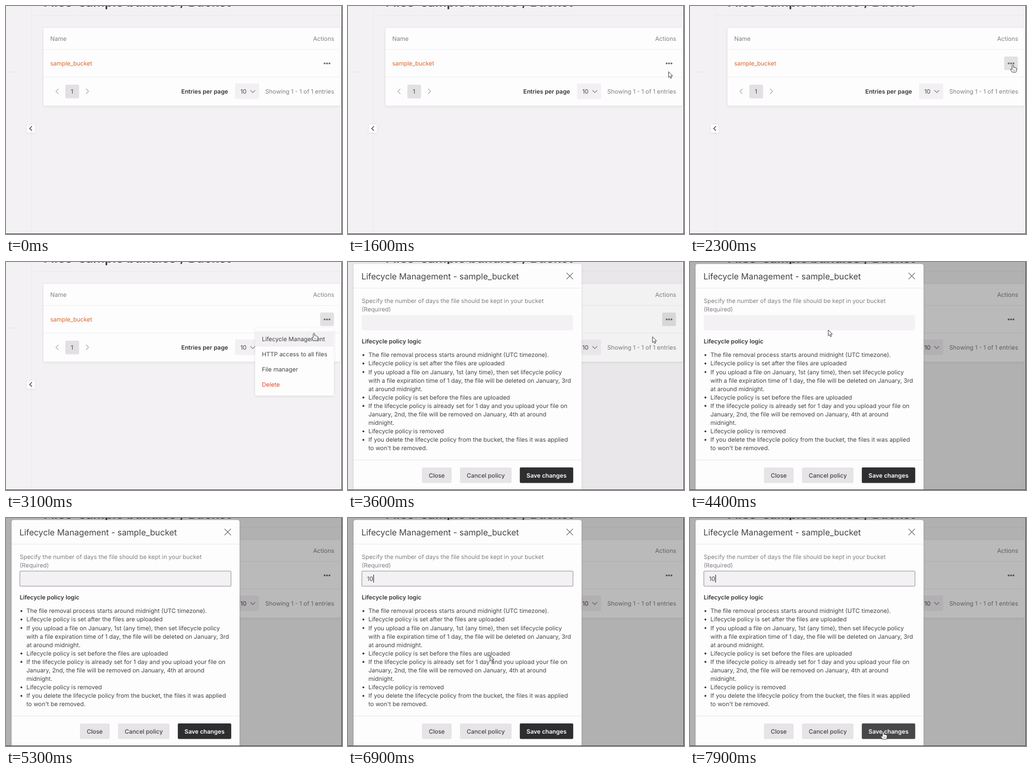
Animation of 600 by 406 pixels, one loop 8 s. Source, as an HTML page:

```html
<!DOCTYPE html>
<html lang="en">
<head>
<meta charset="utf-8">
<title>Lifecycle management</title>
<style>
  html, body { margin: 0; width: 100%; height: 100%; overflow: hidden; background: #f3f1f3; }
  svg { display: block; width: 600px; height: 406px; }
  text { font: 400 10.55px Inter, "Open Sans", sans-serif; fill: #807e80; text-rendering: geometricPrecision; white-space: pre; }
  .dark { fill: #444345; }
  .medium { font-weight: 500; }
  .bold { font-weight: 600; fill: #353436; }
  .title { font-size: 14.95px; fill: #444345; }
  .heading { font-size: 22.8px; font-weight: 600; fill: #353436; }
  .mid { text-anchor: middle; }
  .end { text-anchor: end; }
  .rule { stroke: #ebe9eb; }
  .faint { stroke: #f1eff1; }
  .icon { fill: none; stroke: #666567; stroke-width: 1.1; }
  .box { fill: #e6e4e6; }
  .paper { fill: #fefdfe; }
  .pointer { fill: #fff; stroke: #353436; stroke-width: .9; stroke-linejoin: round; }
</style>
</head>
<body>
<svg viewBox="0 0 600 406">
  <defs>
    <filter id="shadow" x="-10%" y="-10%" width="120%" height="125%">
      <feDropShadow dx="0" dy="1" stdDeviation="2" flood-opacity=".1"/>
    </filter>
  </defs>
  <rect width="600" height="406" fill="#f3f1f3"/>
  <path class="rule" d="M45.5 0V406M45 16.5H600M0 117.5H28"/>
  <text class="heading" x="67" y=".6">Files</text>
  <text class="heading" x="130" y=".6">sample bundles</text>
  <text class="heading" x="311" y=".6">/</text>
  <text class="heading" x="325" y=".6">Bucket</text>

  <rect class="paper" x="67" y="39" width="531" height="138.5" rx="3" filter="url(#shadow)"/>
  <path class="faint" d="M67 77.5H598M67 126.5H598"/>
  <text x="79" y="62">Name</text>
  <text class="end" x="586" y="62">Actions</text>
  <text x="79" y="106" style="fill:#dd6427">sample_bucket</text>
  <rect id="actionBg" x="561" y="90" width="24.5" height="24" rx="2" fill="#e2e0e2"/>
  <g fill="#6b6a6c">
    <circle cx="569" cy="102.2" r="1.6"/><circle cx="573.3" cy="102.2" r="1.6"/><circle cx="577.6" cy="102.2" r="1.6"/>
  </g>
  <rect x="106" y="140" width="24.5" height="24.5" rx="2" fill="#e2e0e2"/>
  <text class="mid dark" x="118" y="156">1</text>
  <path class="icon" d="M93.5 147.5L89 152L93.5 156.5M143 147.5L147.5 152L143 156.5" style="stroke:#b0aeb0"/>
  <text class="bold" x="313" y="156">Entries per page</text>
  <rect x="409" y="138" width="43" height="27.5" rx="2" fill="#f2f0f2"/>
  <text class="dark" x="418.5" y="156">10</text>
  <path class="icon" d="M436.5 150L440.7 154.2L445 150" style="stroke:#8a888a"/>
  <text class="end" x="586" y="156">Showing 1 - 1 of 1 entries</text>

  <rect x="37" y="211" width="14.5" height="14.5" rx="2" class="paper" filter="url(#shadow)"/>
  <path class="icon" d="M46.3 214.2L42.3 218.2L46.3 222.2" style="stroke:#222"/>

  <g id="menu">
    <rect class="paper" x="445" y="117" width="140.5" height="121" rx="2" filter="url(#shadow)"/>
    <rect x="445" y="123.5" width="140.5" height="27" fill="#f2f0f2"/>
    <text class="dark" x="457" y="141">Lifecycle Management</text>
    <text class="dark" x="457" y="168">HTTP access to all files</text>
    <text class="dark" x="457" y="195">File manager</text>
    <text x="457" y="222" style="fill:#e14a2b">Delete</text>
  </g>

  <rect id="shade" width="600" height="406"/>

  <g id="modal">
    <rect class="paper" x="10" y="3.5" width="407" height="412" rx="4" filter="url(#shadow)"/>
    <path class="rule" d="M10 46.5H417M10 352.5H417"/>
    <text class="title" x="24" y="30.5">Lifecycle Management - sample_bucket</text>
    <path class="icon" d="M390.3 19.3L401.7 30.7M401.7 19.3L390.3 30.7"/>
    <text x="24.5" y="72.5">Specify the number of days the file should be kept in your bucket</text>
    <text x="24.5" y="87.7">(Required)</text>
    <rect id="field" x="24.7" y="94.5" width="377" height="27" rx="2" fill="#f3f1f3" stroke-width="1.5"/>
    <text id="value" class="dark" x="34" y="112"></text>
    <rect id="caret" x="45" y="101" width="1" height="14" fill="#222"/>
    <text class="bold" x="24.5" y="145">Lifecycle policy logic</text>
    <g id="list"></g>
    <rect class="box" x="132" y="366" width="53" height="27.5" rx="2"/>
    <rect class="box" x="200" y="366" width="92" height="27.5" rx="2"/>
    <rect id="save" x="306.8" y="365.7" width="95.4" height="27.8" rx="2"/>
    <text class="mid dark medium" x="158.5" y="383.7">Close</text>
    <text class="mid dark medium" x="246" y="383.7">Cancel policy</text>
    <text class="mid bold" x="354.5" y="383.7" style="fill:#fff">Save changes</text>
  </g>

  <g id="cursor">
    <path id="arrow" class="pointer" d="M0 0V10.4L2.3 8.3L3.9 12L5.6 11.2L4.1 7.7H7.3Z"/>
    <g id="hand">
      <path class="pointer" d="M-1.3 1.2Q0-.9 1.3 1.2V5Q2.6 4.2 3.4 5.4Q4.6 4.7 5.4 5.9Q7 5.6 7 7.4Q7 11 5.6 13.5H-1.2Q-2 11.5-4.2 8.8Q-4.1 6.9-1.3 8.6Z"/>
      <path class="icon" d="M1.3 8.5V11.5M3.4 8.5V11.5" style="stroke-width:.7"/>
    </g>
    <path id="beam" class="icon" d="M-2.5 0Q0 0 0 1.5Q0 0 2.5 0M0 1.5V11.5M-2.5 13Q0 13 0 11.5Q0 13 2.5 13"/>
  </g>
  <path d="M599.5 0V405.5H0" fill="none" stroke="#4a494b"/>
</svg>
<script>
const $ = id => document.getElementById(id);
const LOOP = 8000;

// A leading asterisk starts a new bullet.
const lines = [
  "*The file removal process starts around midnight (UTC timezone).",
  "*Lifecycle policy is set after the files are uploaded",
  "*If you upload a file on January, 1st (any time), then set lifecycle policy",
  "with a file expiration time of 1 day, the file will be deleted on January, 3rd",
  "at around midnight.",
  "*Lifecycle policy is set before the files are uploaded",
  "*If the lifecycle policy is already set for 1 day and you upload your file on",
  "January, 2nd, the file will be removed on January, 4th at around",
  "midnight.",
  "*Lifecycle policy is removed",
  "*If you delete the lifecycle policy from the bucket, the files it was applied",
  "to won't be removed."
];
$("list").innerHTML = lines.map((line, i) => {
  const y = 169.3 + i * 15.1;
  const dot = line[0] === "*" ? `<circle cx="27.5" cy="${y - 3.6}" r="1.7" fill="#353436"/>` : "";
  return `${dot}<text class="dark" x="36.5" y="${y}">${line.replace("*", "")}</text>`;
}).join("");

// Pointer path: time, x, y
const path = [
  [100, 86, 100], [200, 140, 122], [400, 330, 140], [800, 544, 137], [900, 544, 137],
  [1600, 572.4, 116.8], [1800, 577, 105], [2700, 576, 104], [2900, 562, 115], [3100, 550, 126.5],
  [3300, 550, 126.5], [3500, 543.8, 133], [3800, 543.8, 133], [4600, 148, 117],
  [4800, 148, 104], [6400, 148, 104], [7300, 338, 357], [7500, 345, 381], [7600, 345, 385],
  [7700, 345, 385], [7900, 345, 380.5]
];
const within = (t, a, b) => t >= a && t < b;
const ramp = (t, a, b) => Math.min(1, Math.max(0, (t - a) / (b - a)));
const show = (id, on) => $(id).style.display = on ? "" : "none";

function pointerAt(t) {
  const i = path.findIndex(p => p[0] > t);
  if (i < 0) return path[path.length - 1].slice(1);
  if (i === 0) return path[0].slice(1);
  const a = path[i - 1], b = path[i], k = ramp(t, a[0], b[0]);
  return [a[1] + (b[1] - a[1]) * k, a[2] + (b[2] - a[2]) * k];
}

function draw(t) {
  show("actionBg", within(t, 2100, 3800));

  const menuIn = ramp(t, 2700, 3000);
  show("menu", within(t, 2800, 3400));
  $("menu").setAttribute("opacity", menuIn);
  $("menu").setAttribute("transform", `translate(0 ${-15 * (t < 3000)})`);

  const shade = t < 3600 ? 0 : t < 3700 ? .045 : .265;
  $("shade").setAttribute("opacity", shade);
  const modalIn = ramp(t, 3300, 3600);
  show("modal", modalIn > 0);
  $("modal").setAttribute("opacity", modalIn);
  $("modal").setAttribute("transform", `translate(0 ${-38 * (1 - modalIn)})`);

  const typed = t < 5600 ? "" : t < 5800 ? "1" : "10";
  $("value").textContent = typed;
  $("field").setAttribute("stroke", t >= 4900 ? "#b5b4b6" : "none");
  $("caret").setAttribute("x", [34.5, 39.5, 45.2][typed.length]);
  show("caret", within(t, 4900, 5300) || within(t, 5600, 6300) || within(t, 6800, 7300) || t >= 7800);
  $("save").setAttribute("fill", t >= 7400 ? "#474648" : "#2e2d2f");

  const [x, y] = pointerAt(t);
  const hand = t < 200 || within(t, 1700, 3400) || t >= 7400;
  const beam = within(t, 4700, 6600);
  show("cursor", t >= 100 && !within(t, 5000, 6500));
  $("cursor").setAttribute("transform", `translate(${x} ${y})`);
  show("hand", hand);
  show("beam", beam);
  show("arrow", !hand && !beam);
}

const start = performance.now();
function tick() {
  const t = (performance.now() - start) % LOOP;
  draw(Math.floor(t / 100) * 100);
  requestAnimationFrame(tick);
}
tick();
</script>
</body>
</html>
```
